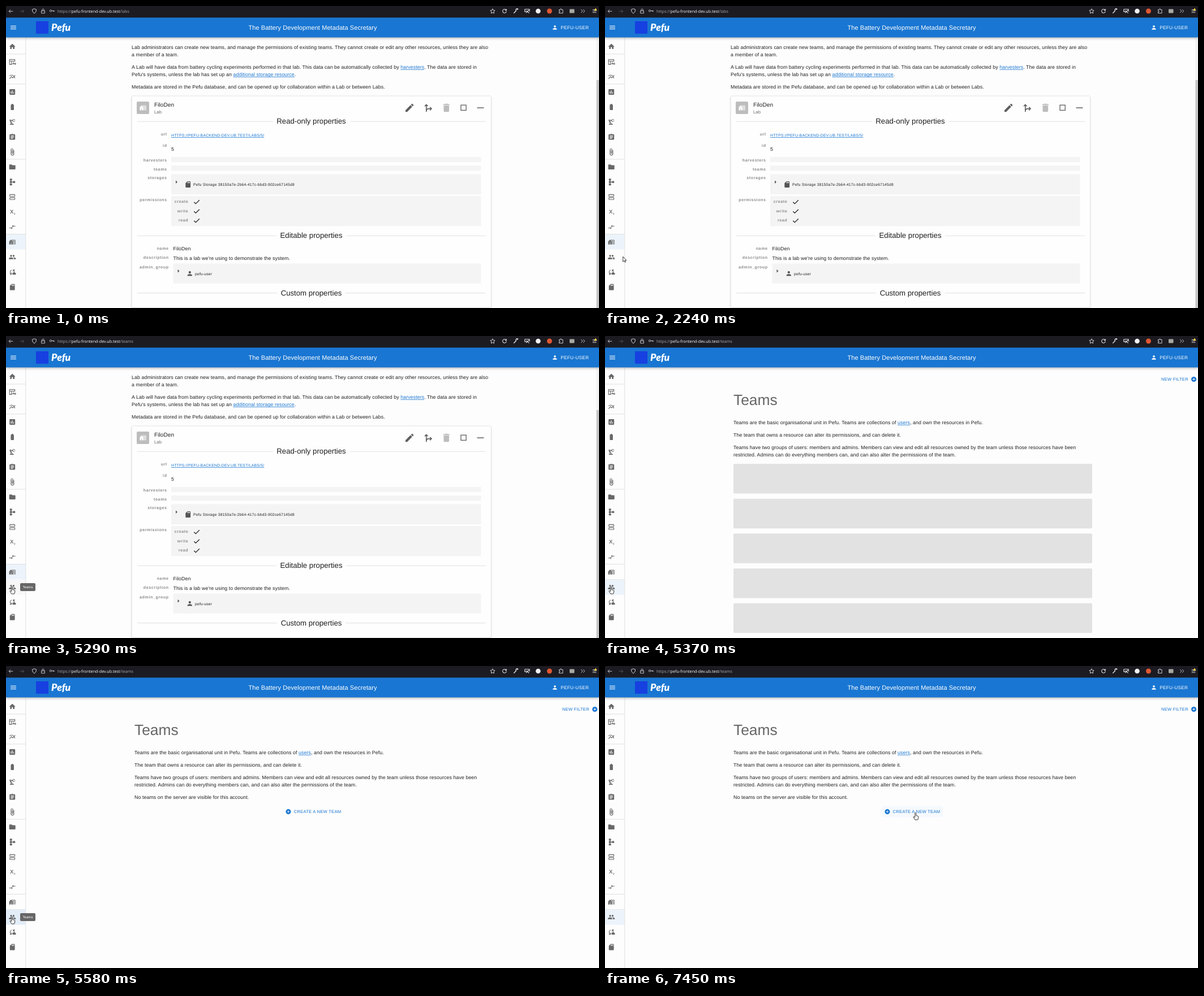
These frames come from a looping animation (1048x534 px, 8 s). An HTML page with a canvas:

```html
<!DOCTYPE html>
<html lang="en">
<head>
<meta charset="utf-8">
<title>Teams walkthrough</title>
<style>
html, body { margin: 0; width: 100%; height: 100%; overflow: hidden; background: #fdfdfd; }
canvas { display: block; }
</style>
</head>
<body>
<canvas id="stage" width="1048" height="534"></canvas>
<script>
const ctx = document.getElementById('stage').getContext('2d');
const LOOP = 8000;
const SANS = '"Liberation Sans", Arial, sans-serif';
const BLUE = '#1976d2', INK = '#1f1f1f', GREY = '#757575', LINE = '#e0e0e0';

// Filled icons on a 24-unit grid
const solid = {
  home: 'M10 20v-6h4v6h5v-8h3L12 3 2 12h3v8z',
  menu: 'M3 18h18v-2H3zM3 13h18v-2H3zM3 8h18V6H3z',
  chart: 'M22 6.9l-1.4-1.4-2.9 3.2C15.7 6.4 12.8 5 9.6 5 6.7 5 4.1 6.2 2 8l1.4 1.4C5.1 7.9 7.3 7 9.6 7c2.7 0 5.1 1.3 6.8 3.2l-2.9 3.3-4-4L2 17l1.5 1.5 6-6 4 4 4-4.6c.8 1.4 1.3 2.9 1.5 4.6h2c-.2-2.3-1-4.4-2-6.1z',
  bars: 'M5 3h14q2 0 2 2v14q0 2-2 2H5q-2 0-2-2V5q0-2 2-2zM7 17h2v-7H7zM11 17h2V7h-2zM15 17h2v-4h-2z',
  battery: 'M15.7 4H14V2h-4v2H8.3Q7 4 7 5.3v15.4Q7 22 8.3 22h7.4q1.3 0 1.3-1.3V5.3Q17 4 15.7 4z',
  robot: 'M20 8.3L16.3 10 14 7.700V6.300L16.300 4l3.700 1.700a.7.7 0 0 0 .6-1.400l-4-1.800q-.7-.3-1.200.2L13.800 4.400Q12.500 3.300 12 5v1H8.800a3 3 0 1 0-4.300 3.600L7 18H6q-2 0-2 2v1h13v-1q0-2-2-2h-1.600L8.400 8.800l.4-.8H12v1q.5 1.700 1.800.6l1.700 1.700q.5.5 1.200.2l4-1.800a.7.7 0 0 0-.7-1.400zM6 8a1 1 0 0 1 0-2 1 1 0 0 1 0 2zM11.100 18H9.200l-2.500-8h.1z',
  clipboard: 'M19 3h-4.2a3 3 0 0 0-5.6 0H5q-2 0-2 2v14q0 2 2 2h14q2 0 2-2V5q0-2-2-2zM12 3a1 1 0 0 1 0 2 1 1 0 0 1 0-2zM14 17H7v-2h7zM17 13H7v-2h10zM17 9H7V7h10z',
  folder: 'M10 4H4Q2 4 2 6v12q0 2 2 2h16q2 0 2-2V8q0-2-2-2h-8z',
  schema: 'M14 9v2h-3V9H8.500V7H11V1H4v6h2.500v2H4v6h2.500v2H4v6h7v-6H8.500v-2H11v-2h3v2h7V9z',
  agenda: 'M5 3h14q2 0 2 2v4q0 2-2 2H5q-2 0-2-2V5q0-2 2-2zM5 5v4h14V5zM5 13h14q2 0 2 2v4q0 2-2 2H5q-2 0-2-2v-4q0-2 2-2zM5 15v4h14v-4z',
  swap: 'M9 14H2v2h7v3l4-4-4-4zM15 13v-3h7V8h-7V5l-4 4z',
  village: 'M18 20V8.4L13.6 4h-2.8L16 9.2V20zM22 20V6.7L19.3 4h-2.8L20 7.5V20zM8 4l-6 6v10h5v-5h2v5h5V10zM9 13H7v-2h2z',
  group: 'M16 11a3 3 0 0 0 0-6 3 3 0 0 0 0 6zM8 11a3 3 0 0 0 0-6 3 3 0 0 0 0 6zM8 13c-2.3 0-7 1.2-7 3.5V19h14v-2.5C15 14.2 10.3 13 8 13zM16 13l-1 .1c1.2.8 2 1.9 2 3.4V19h6v-2.5C23 14.2 18.3 13 16 13z',
  sync: 'M21.500 15a3.500 3.500 0 0 0-6.700-1A3 3 0 0 0 15 20h6.500a2.500 2.500 0 0 0 0-5zM10 4.300v2a6 6 0 0 0-2 10.100V14h2v6H4v-2h2.700A8 8 0 0 1 10 4.300zM20 6h-2.700a8 8 0 0 1 2.600 5h-2a6 6 0 0 0-1.900-3.400V10h-2V4h6z',
  card: 'M18 2h-8L4 8v12q0 2 2 2h12q2 0 2-2V4q0-2-2-2zM12 8h-2V4h2zM15 8h-2V4h2zM18 8h-2V4h2z',
  person: 'M12 12a4 4 0 0 0 0-8 4 4 0 0 0 0 8zM12 14c-2.7 0-8 1.3-8 4v2h16v-2c0-2.7-5.3-4-8-4z',
  pencil: 'M3 17.3V21h3.8L17.8 9.9l-3.7-3.7zM20.7 7q.7-.7 0-1.4l-2.3-2.3q-.7-.7-1.4 0l-1.9 1.8 3.8 3.8z',
  trash: 'M6 19q0 2 2 2h8q2 0 2-2V7H6zM19 4h-3.5l-1-1h-5l-1 1H5v2h14z',
  plus: 'M12 2a10 10 0 0 0 0 20 10 10 0 0 0 0-20zM17 13h-4v4h-2v-4H7v-2h4V7h2v4h4z'
};

// Outline icons on the same grid
const outline = {
  table: 'M11 20H3V4h17v7M3 9h17M9 9v11M15 9v3M15 15a2 2 0 1 0 .1 0M21 16a2 2 0 1 0 .1 0',
  clip: 'M17 6v11.500a4.700 4.700 0 0 1-9.400 0V5a3.300 3.300 0 0 1 6.600 0v10.500a1.700 1.700 0 0 1-3.400 0V6',
  fork: 'M8 21V5M4.500 8.500L8 5l3.500 3.500M8 20q0-6 5-6h6M16 10.500l3.500 3.500-3.500 3.500',
  back: 'M21 12H4M11 5l-7 7 7 7',
  next: 'M3 12h17M13 5l7 7-7 7',
  shield: 'M12 3l8 3q0 11-8 15Q4 17 4 6z',
  lock: 'M5 11h14v10H5zM8 11V7a4 4 0 0 1 8 0v4',
  key: 'M7 8a4 4 0 1 0 .1 0M11 12h11v4M18 12v3',
  star: 'M12 3l2.800 6 6.200.7-4.600 4.400 1.200 6.400-5.600-3.200-5.600 3.200 1.200-6.400L3 9.700 9.200 9z',
  reload: 'M19 8a8 8 0 1 0 1 5M20 3v6h-6',
  wrench: 'M4 20L14 10M13 11a5 5 0 0 1 7-7l-3 3',
  snip: 'M3 5h18v9M3 5v9h6M8 19L19 8M9 10l11 10',
  puzzle: 'M4 21v-5h2a2 2 0 0 0 0-4H4V7h5V5a2 2 0 0 1 4 0v2h6v14z',
  more: 'M4 5l7 7-7 7M13 5l7 7-7 7',
  list: 'M4 6h16M4 12h16M4 18h16'
};

const paths = {};
function icon(name, cx, cy, size, color, width = 2) {
  const p = paths[name] ||= new Path2D(solid[name] || outline[name]);
  ctx.save();
  ctx.translate(cx - size / 2, cy - size / 2);
  ctx.scale(size / 24, size / 24);
  if (solid[name]) {
    ctx.fillStyle = color;
    ctx.fill(p, 'evenodd');
  } else {
    ctx.strokeStyle = color;
    ctx.lineWidth = width;
    ctx.stroke(p);
  }
  ctx.restore();
}

function box(x, y, w, h, color, r = 0) {
  ctx.fillStyle = color;
  ctx.beginPath();
  ctx.roundRect(x, y, w, h, r);
  ctx.fill();
}

function disc(x, y, r, color) {
  ctx.fillStyle = color;
  ctx.beginPath();
  ctx.arc(x, y, r, 0, 7);
  ctx.fill();
}

function text(s, x, y, size = 8.8, color = INK, gap = 0.0825, font = SANS, style = '', align = 'left') {
  ctx.font = `${style} ${size}px ${font}`;
  ctx.letterSpacing = gap + 'px';
  ctx.textAlign = align;
  ctx.fillStyle = color;
  ctx.fillText(s, x, y);
  return ctx.measureText(s).width;
}

// Parts between bars are links
function para(s, x, y) {
  s.split('|').forEach((part, i) => {
    const w = text(part, x, y, 8.8, i % 2 ? BLUE : INK);
    if (i % 2) box(x, y + 1.1, w, 0.7, BLUE);
    x += w;
  });
}

function shadow(color, blur, dy, draw) {
  ctx.save();
  ctx.shadowColor = color;
  ctx.shadowBlur = blur;
  ctx.shadowOffsetY = dy;
  draw();
  ctx.restore();
}

function browserBar(path) {
  const pale = '#e4e4e8';
  box(0, 0, 1048, 20.5, '#1c1b22');
  icon('back', 8.5, 9.3, 10, pale);
  icon('next', 28.5, 9.3, 10, '#5d5c66');
  icon('shield', 50, 9, 11, pale);
  icon('lock', 65.5, 9, 10, pale);
  icon('key', 81, 8.5, 10, pale);
  const font = '"Open Sans", sans-serif';
  let x = 91;
  x += text('https://', x, 12, 7.2, '#a5a5ac', 0, font);
  x += text('pefu-frontend-dev.ub.test', x, 12, 7.2, '#fbfbfe', 0, font);
  text(path, x, 12, 7.2, '#a5a5ac', 0, font);
  icon('star', 860, 9, 11, pale);
  icon('reload', 881, 9, 10, pale, 2.5);
  icon('wrench', 901, 9, 11, pale, 3);
  icon('snip', 921, 9, 11, pale, 2.5);
  disc(940.5, 9, 4.3, '#f2f2f2');
  disc(960.5, 9, 4.5, '#de5833');
  icon('puzzle', 981, 8.7, 10.5, pale);
  box(996, 5.5, 8.5, 7, '#a9a8a2', 1);
  icon('more', 1019.5, 9, 10, pale);
  icon('list', 1040, 9, 10, pale);
  ctx.fillStyle = '#ffd23c';
  ctx.fill(new Path2D('M1042 3.500l2.700 4.500h-5.400z'));
}

function appBar() {
  shadow('rgba(0,0,0,.36)', 5, 1.7, () => box(0, 18, 1048, 37.6, BLUE));
  icon('menu', 13, 38, 13.2, '#fff');
  box(53, 27, 22, 22, '#1740e0');
  text('Pefu', 80, 44.3, 17.5, '#fff', 0, 'Lato, sans-serif', 'italic 900');
  text('The Battery Development Metadata Secretary', 542, 41.8, 11, '#fff', 0.0825, SANS, '', 'center');
  icon('person', 970, 38, 10.9, '#fff');
  text('PEFU-USER', 980.3, 41, 8.25, '#fff', 0.235);
}

const side = ['home', 'table', 'chart', 'bars', 'battery', 'robot', 'clipboard', 'clip', 'folder',
  'schema', 'agenda', 'sub', 'swap', 'village', 'group', 'sync', 'card'];

function sidebar(onTeams, hover) {
  box(0, 56, 34.5, 478, '#fdfdfd');
  if (!onTeams) box(0, 404, 34.5, 26.5, '#ecf3fb');
  if (onTeams || hover) box(0, 431, 34.5, 26.5, !onTeams ? '#f7f7f7' : hover ? '#e2edf8' : '#ecf3fb');
  side.forEach((name, i) => {
    const y = i ? 72.4 + 26.54 * i : 71.7;
    if (name === 'sub') {
      text('X', 7, y + 3, 9.6, GREY, 0, SANS, 'bold');
      text('2', 14, y + 4.2, 4.5, GREY, 0, SANS, 'bold');
    } else icon(name, 11.2, y, 13.2, '#686868');
  });
  for (const y of [85, 138, 271, 403.5]) box(0, y - 0.5, 34.5, 1, LINE);
  if (onTeams) box(0, 430.3, 34.5, 0.7, LINE);
  box(34.3, 56, 1, 478, LINE);
}

function label(s, y, right = 284) {
  text(s, right + 0.6, y + 2.3, 7.1, '#8a8a8a', 0.6, SANS, 'bold', 'right');
}

function section(s, y) {
  const w = text(s, 539.5, y + 4.6, 13.2, INK, 0, SANS, '', 'center');
  const l = 533 - w / 2, r = 546.5 + w / 2;
  box(232, y, l - 232, 1, LINE);
  box(r, y, 848 - r, 1, LINE);
}

function expander(x, y) {
  ctx.fillStyle = '#555';
  ctx.fill(new Path2D(`M${x} ${y - 2.8}l3 2.8-3 2.8z`));
}

function labPage() {
  para('Lab administrators can create new teams, and manage the permissions of existing teams. They cannot create or edit any other resources, unless they are also', 222, 75.8);
  para('a member of a team.', 222, 89);
  para('A Lab will have data from battery cycling experiments performed in that lab. This data can be automatically collected by |harvesters|. The data are stored in', 222, 111);
  para("Pefu's systems, unless the lab has set up an |additional storage resource|.", 222, 124.2);
  para('Metadata are stored in the Pefu database, and can be opened up for collaboration within a Lab or between Labs.', 222, 146.2);

  shadow('rgba(0,0,0,.3)', 3, 0.6, () => box(222.5, 159.5, 634.5, 373.5, '#fefefe', 2));
  box(231, 169, 22, 22, '#bdbdbd', 2);
  icon('village', 242, 180, 13.2, '#fff');
  text('FiloDen', 262, 178, 10);
  text('Lab', 262, 190, 7.7, '#666');
  icon('pencil', 713.2, 180, 19.2, '#5f5f5f');
  icon('fork', 746, 180, 19.2, '#5f5f5f');
  icon('trash', 778.3, 180, 19.2, '#bdbdbd');
  ctx.strokeStyle = '#5f5f5f';
  ctx.lineWidth = 1.3;
  ctx.strokeRect(804, 175.2, 9.2, 9.2);
  box(832.5, 179.3, 12, 1.5, '#5f5f5f');

  section('Read-only properties', 203.8);
  label('url', 226.5);
  const w = text('HTTPS://PEFU-BACKEND-DEV.UB.TEST/LABS/5/', 292, 231.3, 6.9, BLUE, 0.2);
  box(292, 232.3, w, 0.7, BLUE);
  label('id', 247);
  text('5', 292, 255.6);
  label('harvesters', 273);
  label('teams', 288.5);
  label('storages', 304);
  label('permissions', 342.5);
  for (const [y, h] of [[267, 9], [282, 9.3], [297.5, 35.5], [336, 53.3]]) box(292, y, 547.5, h, '#f4f4f4');
  expander(300, 311.2);
  icon('card', 321.7, 315.5, 13.2, '#555');
  text('Pefu Storage 38150a7e-2b64-417c-bbd3-902ce67145d8', 331, 318, 6.7, INK, 0.22);
  ['create', 'write', 'read'].forEach((s, i) => {
    const y = 346 + 16.5 * i;
    label(s, y, 321.7);
    ctx.strokeStyle = '#222';
    ctx.lineWidth = 1.3;
    ctx.stroke(new Path2D(`M332.3 ${y + 0.7}l3 3 6.500-6.500`));
  });

  section('Editable properties', 405.8);
  label('name', 428.5, 287);
  text('FiloDen', 295.5, 432);
  label('description', 445, 287);
  text("This is a lab we're using to demonstrate the system.", 295.5, 448.7);
  label('admin_group', 461.5, 287);
  box(295.5, 455.5, 544, 35, '#f4f4f4');
  expander(303.5, 468.6);
  icon('person', 324.8, 473, 12.5, '#555');
  text('pefu-user', 334, 475.6, 6.7, INK, 0.22);
  section('Custom properties', 507);

  box(1043, 56, 5, 478, '#f3f3f3');
  box(1043.5, 131, 4.5, 403, '#c6c6c6');
}

function teamsPage(loaded, hover) {
  text('NEW FILTER', 983, 79.3, 7.65, BLUE, 0.22);
  icon('plus', 1040.6, 76.5, 10.9, BLUE);
  text('Teams', 227, 122.3, 26.4, '#666', 0);
  para('Teams are the basic organisational unit in Pefu. Teams are collections of |users|, and own the resources in Pefu.', 227, 156);
  para('The team that owns a resource can alter its permissions, and can delete it.', 227, 178);
  para('Teams have two groups of users: members and admins. Members can view and edit all resources owned by the team unless those resources have been', 227, 200);
  para('restricted. Admins can do everything members can, and can also alter the permissions of the team.', 227, 213.2);
  if (!loaded) {
    for (let i = 0; i < 5; i++) box(227, 226 + 61.65 * i, 634, 52.5, '#e2e2e2', 2);
    return;
  }
  para('No teams on the server are visible for this account.', 227, 235);
  if (hover) box(490, 248, 107, 19.5, '#f5f9fd', 2);
  icon('plus', 499, 257.6, 10.9, BLUE);
  text('CREATE A NEW TEAM', 508.6, 260.4, 7.65, BLUE, 0.22);
}

function tooltip(alpha) {
  if (alpha <= 0) return;
  ctx.globalAlpha = alpha;
  box(25, 437, 27, 14, '#666', 2);
  text('Teams', 38.5, 446, 6, '#fff', 0.03, SANS, '', 'center');
  ctx.globalAlpha = 1;
}

const linear = p => p;
const easeIn = p => p * p;
const easeOut = p => 1 - (1 - p) ** 1.5;
const easeBoth = p => p * p * (3 - 2 * p);

// Pointer moves: the recording shows each one as a number of steps along a curve
const moves = [
  { from: 390, to: 600, steps: 4, ease: linear, bend: [830, 425], end: [714, 395] },
  { from: 800, to: 1550, steps: 10, ease: easeOut, bend: [380, 319], end: [174, 433] },
  { from: 1620, to: 2370, steps: 12, ease: easeOut, bend: [90, 441], end: [22.5, 443.5] },
  { from: 3030, to: 3160, steps: 3, ease: linear, bend: [16, 443.5], end: [11, 443.5] },
  { from: 5710, to: 5910, steps: 4, ease: easeIn, bend: [21, 442], end: [32, 437] },
  { from: 5980, to: 6450, steps: 7, ease: easeBoth, bend: [240, 360], end: [421, 308] },
  { from: 6650, to: 7450, steps: 11, ease: easeOut, bend: [505, 238], end: [549, 259.5] }
];

function pointerAt(t) {
  if (t < moves[0].from) return null;
  let pos = [1060, 508];
  for (const { from, to, steps, ease, bend, end } of moves) {
    if (t < from) break;
    const step = Math.min(steps, 1 + Math.floor((t - from) / (to - from) * (steps - 1) + 0.02));
    const u = ease(step / steps), v = 1 - u;
    pos = pos.map((a, i) => v * v * a + 2 * u * v * bend[i] + u * u * end[i]);
  }
  return pos;
}

const arrow = new Path2D('M0 0v9l2-1.900 1.500 3 1.400-.7-1.500-2.800h2.800z');
const hand = new Path2D('M-1.200 1q0-1 1-1t1 1v4l3.200.9q1 .4.900 1.600l-.5 3-.8 2H-1l-2.800-4.300q-.5-1.300.7-1.300l1.900 1.200z');

function pointer([x, y], shape) {
  ctx.save();
  ctx.translate(x, y);
  ctx.fillStyle = '#fff';
  ctx.strokeStyle = '#222';
  ctx.lineWidth = 0.9;
  ctx.fill(shape);
  ctx.stroke(shape);
  ctx.restore();
}

const clamp = v => Math.max(0, Math.min(1, v));

function tipAlpha(t) {
  if (t < 5365) return clamp((t - 3290) / 140);
  return Math.min(clamp((t - 5440) / 140), 1 - clamp((t - 5910) / 140));
}

function draw(t) {
  const onTeams = t >= 5365, loaded = t >= 5575;
  const pos = pointerAt(t);
  const overRow = pos && pos[0] < 30 && pos[1] > 431;
  const overButton = pos && loaded && pos[0] > 490 && pos[1] < 267;
  box(0, 0, 1048, 534, '#fdfdfd');
  if (onTeams) teamsPage(loaded, overButton);
  else labPage();
  sidebar(onTeams, overRow && (!onTeams || t >= 5440));
  appBar();
  browserBar(t >= 5160 ? '/teams' : '/labs');
  tooltip(tipAlpha(t));
  if (pos) pointer(pos, overRow || overButton ? hand : arrow);
}

ctx.textRendering = 'geometricPrecision';
const start = performance.now();
function tick() {
  draw((performance.now() - start) % LOOP);
  requestAnimationFrame(tick);
}
tick();
</script>
</body>
</html>
```
